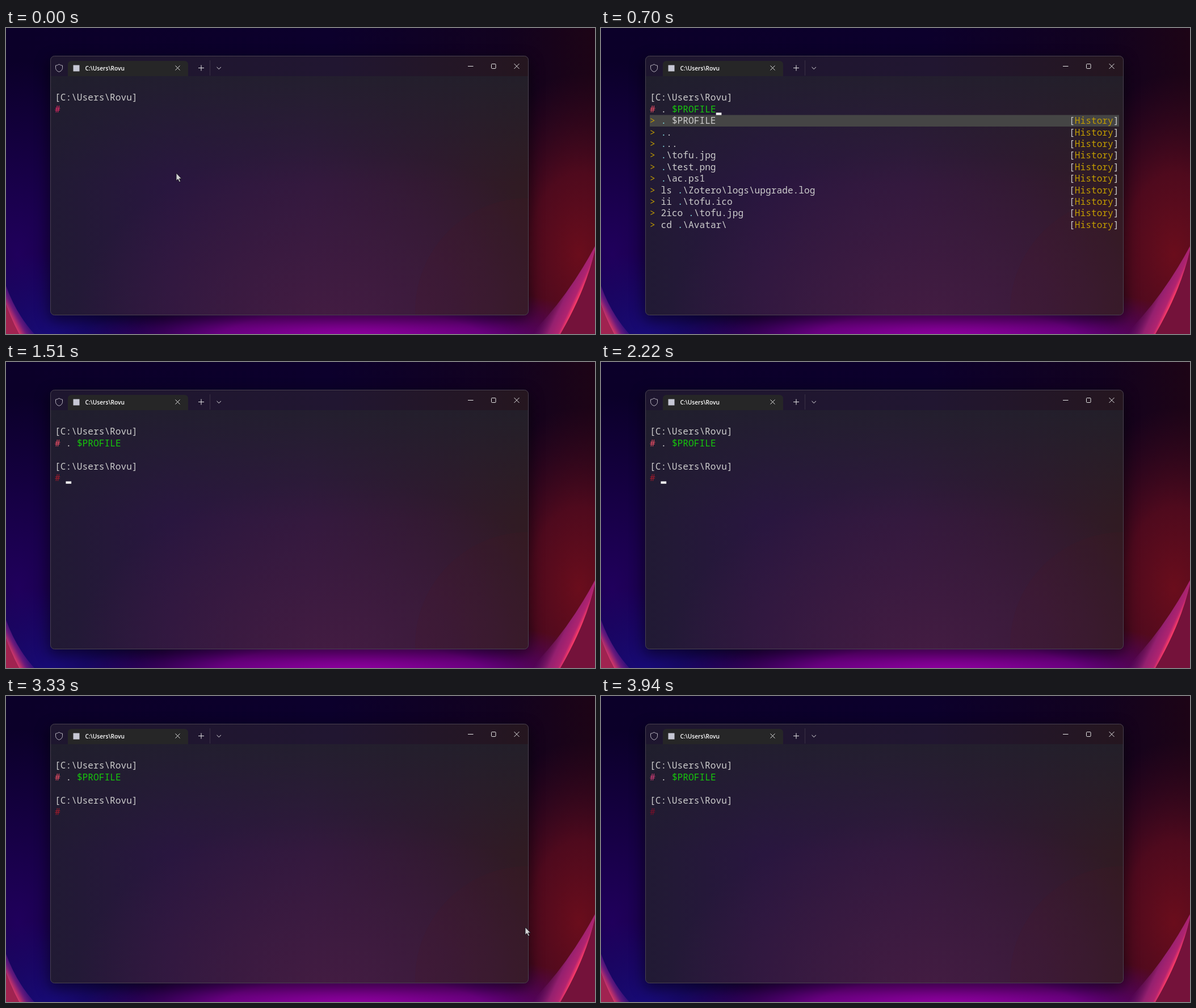
An HTML page that plays this animation: 1038 px wide and 540 px high, repeating every 4040 ms.

```html
<!DOCTYPE html>
<html lang="en">
<head>
<meta charset="utf-8">
<title>Terminal history</title>
<style>
  html, body { margin: 0; width: 100%; height: 100%; overflow: hidden; background: #0b0028; }
  svg { display: block; }
  #screen text { font: 16.2px "Noto Sans Mono", monospace; white-space: pre; }
  .tab { font: 600 10.2px "Open Sans", sans-serif; fill: #fff; }
  .icons { fill: none; stroke: #e6e6e6; }
</style>
</head>
<body>
<svg width="1038" height="540" viewBox="0 0 1038 540">
  <defs>
    <linearGradient id="sky">
      <stop offset="0" stop-color="#0b0029"/><stop offset=".55" stop-color="#0c002c"/>
      <stop offset=".85" stop-color="#12021f"/><stop offset="1" stop-color="#1d0416"/>
    </linearGradient>
    <radialGradient id="violet"><stop stop-color="#20005c"/><stop offset="1" stop-color="#20005c" stop-opacity="0"/></radialGradient>
    <radialGradient id="blue"><stop stop-color="#180b78"/><stop offset="1" stop-color="#180b78" stop-opacity="0"/></radialGradient>
    <radialGradient id="magenta"><stop stop-color="#9a00a8"/><stop offset=".5" stop-color="#7c0092" stop-opacity=".85"/><stop offset="1" stop-color="#500080" stop-opacity="0"/></radialGradient>
    <radialGradient id="red"><stop stop-color="#6a0d1c"/><stop offset=".45" stop-color="#580b1e" stop-opacity=".85"/><stop offset="1" stop-color="#400820" stop-opacity="0"/></radialGradient>
    <linearGradient id="petalRight" gradientUnits="userSpaceOnUse" x1="950" y1="495" x2="1004" y2="520">
      <stop offset="0" stop-color="#5f1468" stop-opacity="0"/><stop offset=".4" stop-color="#94206f"/>
      <stop offset=".66" stop-color="#b02470"/><stop offset=".76" stop-color="#f83a68"/><stop offset="1" stop-color="#ff3464"/>
    </linearGradient>
    <linearGradient id="petalLeft" gradientUnits="userSpaceOnUse" x1="40" y1="498" x2="6" y2="516">
      <stop offset="0" stop-color="#30108a" stop-opacity="0"/><stop offset=".6" stop-color="#6a1a7c"/>
      <stop offset=".85" stop-color="#c83468"/><stop offset="1" stop-color="#e84468"/>
    </linearGradient>
    <linearGradient id="pane">
      <stop offset="0" stop-color="#211a34"/><stop offset=".25" stop-color="#29163f"/>
      <stop offset=".55" stop-color="#30183d"/><stop offset=".8" stop-color="#30192f"/><stop offset="1" stop-color="#301b22"/>
    </linearGradient>
    <linearGradient id="paneTop" x2="0" y2="1">
      <stop offset="0" stop-color="#20202b" stop-opacity=".8"/><stop offset=".45" stop-color="#20202b" stop-opacity="0"/>
    </linearGradient>
    <radialGradient id="paneGlow"><stop stop-color="#431c42"/><stop offset="1" stop-color="#431c42" stop-opacity="0"/></radialGradient>
    <linearGradient id="bar">
      <stop offset="0" stop-color="#1e162f"/><stop offset=".6" stop-color="#211631"/><stop offset="1" stop-color="#25161f"/>
    </linearGradient>
    <filter id="blur" x="-20%" y="-20%" width="140%" height="140%"><feGaussianBlur stdDeviation="13"/></filter>
    <clipPath id="frame"><rect x="78.5" y="49.5" width="842" height="457" rx="7"/></clipPath>
  </defs>

  <rect width="1038" height="540" fill="url(#sky)"/>
  <ellipse cx="20" cy="400" rx="230" ry="340" fill="url(#violet)"/>
  <ellipse cx="1010" cy="400" rx="190" ry="320" fill="url(#red)"/>
  <ellipse cx="80" cy="545" rx="200" ry="150" fill="url(#blue)"/>
  <ellipse cx="610" cy="555" rx="480" ry="110" fill="url(#magenta)"/>
  <path d="M1038 392Q1022 462 977 540H1038Z" fill="#74123a"/>
  <path d="M1038 385Q990 475 925 540H977Q1022 462 1038 392Z" fill="url(#petalRight)"/>
  <path d="M0 488Q9 514 23 540H0Z" fill="#a02350"/>
  <path d="M0 455Q18 505 50 540H23Q9 514 0 488Z" fill="url(#petalLeft)"/>

  <rect x="76" y="56" width="847" height="460" rx="9" opacity=".5" filter="url(#blur)"/>
  <g clip-path="url(#frame)">
    <rect x="78" y="49" width="843" height="458" fill="url(#pane)"/>
    <ellipse cx="580" cy="520" rx="460" ry="310" fill="url(#paneGlow)"/>
    <ellipse cx="921" cy="500" rx="200" ry="200" fill="#4a1a22" opacity=".15"/>
    <rect x="78" y="85" width="843" height="422" fill="url(#paneTop)"/>
    <rect x="78" y="49" width="843" height="36" fill="url(#bar)"/>
    <path d="M109 85V65q0-7 7-7H314q7 0 7 7V85Z" fill="#262627"/>
  </g>
  <rect x="78.5" y="49.5" width="842" height="457" rx="7" fill="none" stroke="#49424f"/>
  <rect x="118.5" y="65.5" width="11" height="11" fill="#c6c7d4"/>
  <text class="tab" x="139.5" y="75">C:\Users\Rovu</text>
  <g class="icons">
    <path d="M93.5 64q3 2.2 6 2.2v4.3q0 4.6-6 7-6-2.4-6-7v-4.3q3 0 6-2.2Z" stroke="#b9b4c0"/>
    <path d="M298.5 66.5l8 8m0-8l-8 8M339 70.5h10m-5-5v10M371.5 69l3.7 3.5 3.7-3.5"/>
    <path d="M359.5 57V84" stroke="#3a2f45"/>
    <path d="M814 67.5h9.5M895.5 63l9 9m0-9l-9 9"/>
    <rect x="855.5" y="63.5" width="7.5" height="8" rx="1"/>
  </g>

  <g id="screen"></g>
  <rect id="caret" width="9.7" height="4.2" fill="#f2f2f2"/>
  <path id="pointer" d="M0 0V13.5L3.1 10.8 5.3 15.8 7.6 14.8 5.4 9.9H9.4Z" fill="#d4d4d4" stroke="#14101c" stroke-width=".9"/>
</svg>

<script>
const LOOP = 4040, CELL = 9.725, LINE = 20.4;
const GREY = '#cccccc', GOLD = '#c19c00', CYAN = '#7fd6dc', GREEN = '#16c60c';
const PROMPT = '[C:\\Users\\Rovu]';
const history = [
  '. $PROFILE', '..', '...', '.\\tofu.jpg', '.\\test.png', '.\\ac.ps1',
  'ls .\\Zotero\\logs\\upgrade.log', 'ii .\\tofu.ico', '2ico .\\tofu.jpg', 'cd .\\Avatar\\'
];
const screen = document.getElementById('screen');
const caret = document.getElementById('caret');
const pointer = document.getElementById('pointer');
const timed = [];
const colX = col => 86 + col * CELL;
const rowY = row => 112.4 + row * LINE;

function add(tag, attributes, from, to) {
  const el = document.createElementNS('http://www.w3.org/2000/svg', tag);
  for (const name in attributes) el.setAttribute(name, attributes[name]);
  screen.append(el);
  timed.push({ el, from, to });
  return el;
}

function write(col, row, text, fill, from = 0, to = LOOP) {
  add('text', { x: colX(col), y: rowY(row) + 16, fill }, from, to).textContent = text;
}

add('rect', { x: 86, y: rowY(2) + .3, width: 827, height: LINE, fill: '#454545' }, 700, 1510);
write(0, 0, PROMPT, GREY);
write(0, 1, '#', '#e62b66', 0, 700);
write(0, 1, '#', '#ee4f66', 700, 3940);
write(0, 1, '#', '#d33f78', 3940);
write(2, 1, '.', GREY, 500);
write(4, 1, '$PROFILE', GREEN, 700);
write(0, 3, PROMPT, GREY, 1510);
write(0, 4, '#', '#a01c2c', 1510, 3940);
write(0, 4, '#', '#780f2a', 3940);

history.forEach((command, i) => {
  const put = (col, text, fill) => write(col, i + 2, text, fill, 500, 1510);
  const dot = command.indexOf('.');
  put(0, '>', GOLD);
  put(2, command.slice(0, dot), GREY);
  put(2 + dot, '.', CYAN);
  put(3 + dot, command.slice(dot + 1), GREY);
  put(76, '[', GREY);
  put(77, 'History', GOLD);
  put(84, ']', GREY);
});

// Each entry: start time, then a position, or nothing while hidden.
const caretSteps = [
  [0], [300, 2, 1], [500, 3, 1], [700, 12, 1], [1110, 0, 2], [1510, 2, 4],
  [1710], [2220, 2, 4], [2730], [3430, 2, 4], [3940]
];
const pointerSteps = [
  [0, 300, 256], [500], [2730, 448, 287], [3330, 915, 408],
  [3430, 948, 446], [3530, 963, 465], [3630, 967, 470], [3730]
];

function place(el, steps, time, toX, toY) {
  const [, x, y] = steps.findLast(step => step[0] <= time);
  const visible = x !== undefined;
  el.style.display = visible ? '' : 'none';
  if (visible) el.setAttribute('transform', `translate(${toX(x)} ${toY(y)})`);
}

function draw() {
  const time = performance.now() % LOOP;
  for (const { el, from, to } of timed) {
    el.style.display = time >= from && time < to ? '' : 'none';
  }
  place(caret, caretSteps, time, colX, row => rowY(row) + 16.6);
  place(pointer, pointerSteps, time, x => x, y => y);
  requestAnimationFrame(draw);
}
draw();
</script>
</body>
</html>
```
